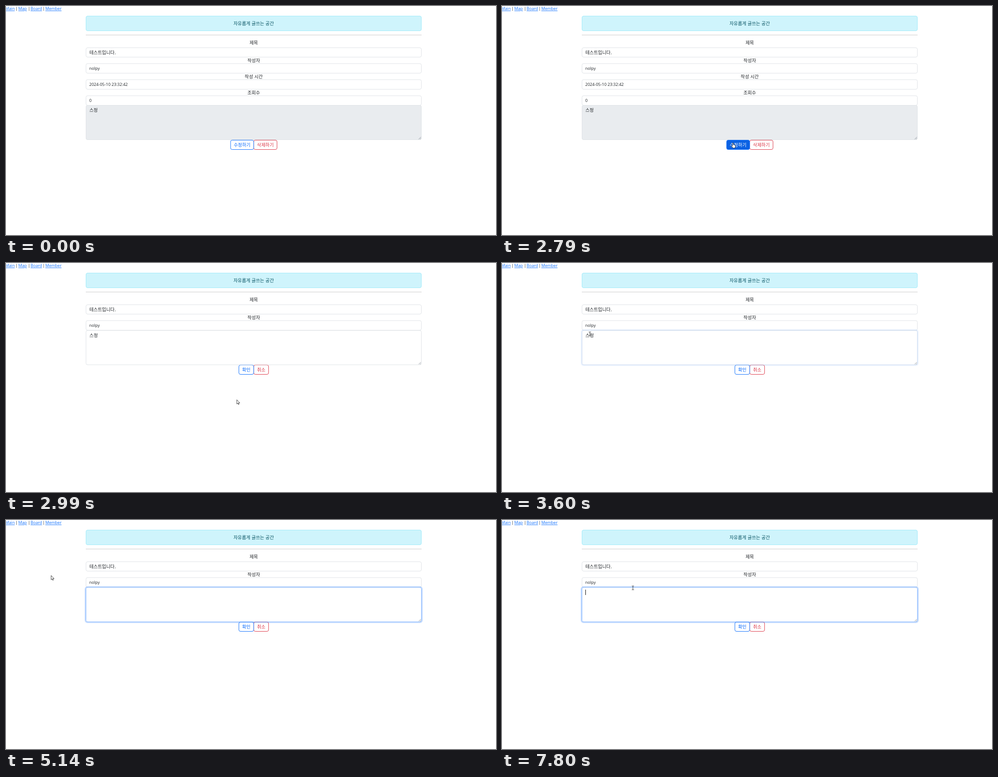
An HTML page for the animation above (8 s loop, 1093 px wide and 513 px high).

```html
<!DOCTYPE html>
<html lang="ko">
<head>
<meta charset="utf-8">
<title>게시판</title>
<style>
  html, body { margin: 0; width: 100%; height: 100%; overflow: hidden; background: #fff; }
  svg { display: block; width: 1093px; height: 513px; }
  text { font: 10.2px "Noto Sans CJK KR", "Noto Sans CJK", sans-serif; fill: #212529; }
  .latin { font: 9.1px "Open Sans", "Noto Sans", sans-serif; }
  .mid { text-anchor: middle; }
  .link { fill: #0d6efd; text-decoration: underline; }
  .box { fill: #fff; stroke: #dee2e6; }
  .blue { fill: #fff; stroke: #0d6efd; }
  .red { fill: #fff; stroke: #dc3545; }
  text.blue { fill: #0d6efd; stroke: none; }
  text.red { fill: #dc3545; stroke: none; }
  .grip { fill: none; stroke: #6c757d; stroke-width: .7; }
  #ring { fill: none; stroke: #0d6efd; stroke-opacity: .25; stroke-width: 2.4; }
  #cursor path { fill: #fff; stroke: #000; stroke-width: .75; stroke-linejoin: round; }
  #cursor #beam { fill: none; stroke: #222; stroke-width: .9; }
</style>
</head>
<body>
<svg viewBox="0 0 1093 513">
  <g class="nav">
    <text class="latin link" x="-1.7" y="9.4">Main</text>
    <text class="latin mid" x="23.5" y="9.4">|</text>
    <text class="latin link" x="27.6" y="9.4">Map</text>
    <text class="latin mid" x="51.4" y="9.4">|</text>
    <text class="latin link" x="54.8" y="9.4">Board</text>
    <text class="latin mid" x="84" y="9.4">|</text>
    <text class="latin link" x="87.7" y="9.4">Member</text>
  </g>

  <rect x="178.5" y="22.5" width="748" height="33" rx="3.5" fill="#cff4fc" stroke="#9eeaf9"/>
  <text class="mid" x="552.5" y="42.7" style="fill:#055160">자유롭게 글쓰는 공간</text>
  <rect x="178" y="64.5" width="749" height="1" fill="#c7c8c9"/>

  <text class="mid" x="552.5" y="85.5">제목</text>
  <rect class="box" x="178.5" y="93.5" width="748" height="21" rx="3.5"/>
  <text x="186" y="107.9">테스트입니다.</text>
  <text class="mid" x="552.5" y="125.9">작성자</text>
  <rect class="box" x="178.5" y="129" width="748" height="21.5" rx="3.5"/>
  <text class="latin" x="185.7" y="143.2">nolpy</text>

  <g id="view">
    <text class="mid" x="552.5" y="161.5">작성 시간</text>
    <rect class="box" x="178.5" y="165" width="748" height="21.5" rx="3.5"/>
    <text class="latin" x="185.7" y="179">2024-05-10 23:32:42</text>
    <text class="mid" x="552.5" y="197.6">조회수</text>
    <rect class="box" x="178.5" y="201" width="748" height="21.5" rx="3.5"/>
    <text class="latin" x="185.7" y="214.8">0</text>
    <rect x="178.5" y="222.5" width="748" height="77" rx="3.5" fill="#e9ecef" stroke="#dee2e6"/>
    <path class="grip" d="M920.5 298.5l5-5M923.5 298.5l2-2"/>
    <text x="186" y="237.4">스정</text>
    <rect class="red" x="552.7" y="300.5" width="51.8" height="21" rx="3.5"/>
    <text class="red mid" x="578.6" y="314.9">삭제하기</text>
    <rect id="modify" class="blue" x="501" y="300.5" width="51.5" height="21" rx="3.5"/>
    <text id="modifyLabel" class="blue mid" x="526.7" y="314.9">수정하기</text>
  </g>

  <g id="edit">
    <rect class="red" x="552.7" y="228.5" width="33" height="21" rx="3.5"/>
    <text class="red mid" x="569.3" y="243">취소</text>
    <rect class="blue" x="519.5" y="228.5" width="33" height="21" rx="3.5"/>
    <text class="blue mid" x="536" y="243">확인</text>
    <rect id="ring" x="176.8" y="149.6" width="751.4" height="79.9" rx="5"/>
    <rect id="area" class="box" x="178.5" y="151" width="748" height="77" rx="3.5"/>
    <path class="grip" d="M920.5 227l5-5M923.5 227l2-2"/>
    <rect id="select" y="155" height="14" fill="#0078d7"/>
    <text x="186" y="165.8"><tspan id="first">스</tspan><tspan id="second">정</tspan></text>
    <rect id="compose" x="186" y="167" width="9" height="1" fill="#212529"/>
    <rect id="caret" y="156" width="1" height="12" fill="#000"/>
  </g>

  <g id="cursor">
    <path id="arrow" d="M.4 .4V9.9L2.6 7.9 4 11.1 5.4 10.5 4 7.4H7Z"/>
    <path id="hand" d="M3.3 .6Q4.4 .6 4.4 1.7V4.8L7.6 5.5Q8.9 5.9 8.8 7.2L8 12.2H3.6L.7 8.4Q0 7.1 1 6.8L2.3 7.8V1.7Q2.3 .6 3.3 .6Z"/>
    <path id="beam" d="M-2.4 .5H-.7L0 1 .7 .5H2.4M0 1V8.5M-2.4 9H-.7L0 8.5 .7 9H2.4"/>
  </g>
</svg>
<script>
const LOOP = 8000;
const el = id => document.getElementById(id);
const show = (id, on) => { el(id).style.display = on ? "" : "none"; };

// Each row holds from its time until the next row.
const at = (rows, t) => rows.reduce((last, row) => (row[0] <= t ? row : last));

const pointer = [
  [0, ""],
  [130, "arrow", 1003, 491], [200, "arrow", 965, 470], [265, "arrow", 872, 424],
  [330, "arrow", 752, 374], [400, "arrow", 642, 338], [465, "arrow", 565, 319],
  [530, "hand", 520, 307], [600, "hand", 511.8, 306],
  [2920, "arrow", 514.5, 306],
  [3060, "arrow", 506, 302], [3130, "arrow", 468, 282], [3200, "arrow", 400, 248],
  [3270, "beam", 328, 208], [3340, "beam", 268, 178], [3400, "beam", 232, 164],
  [3470, "beam", 216, 158], [3530, "beam", 210, 157],
  [3600, "beam", 196, 154], [3670, "beam", 118, 142], [3740, "beam", 4, 133],
  [3810, "arrow", 100.3, 124],
  [6010, "arrow", 116, 128], [6080, "arrow", 168, 140], [6140, "beam", 240, 151],
  [6210, "beam", 273.3, 150.2],
  [6540, "beam", 284, 148.5], [6600, "beam", 292, 147.3]
];

const button = [
  [0, "#fff", "#0d6efd"], [530, "#86b7fe", "#fff"], [600, "#0d6efd", "#fff"],
  [2790, "#0b62e3", "#fff"], [2860, "#0b68f0", "#fff"], [2920, "#0d6efd", "#fff"]
];

const focus = [
  [0, 0, "#dee2e6"], [3600, .3, "#c4d5ed"], [3670, .75, "#9cc2f8"], [3740, 1, "#86b7fe"]
];

const selection = [[0, 0], [3670, 1], [3740, 2], [4210, 0]];

const caret = [
  [0, 0], [4210, 195], [4610, 186], [5140, 0], [5670, 186],
  [6210, 0], [6740, 186], [7270, 0], [7800, 186]
];

function draw(t) {
  const editing = t >= 2990;
  show("view", !editing);
  show("edit", editing);

  const [, fill, ink] = at(button, t);
  el("modify").style.fill = fill;
  el("modifyLabel").style.fill = ink;

  const [, glow, border] = at(focus, t);
  el("ring").style.opacity = glow;
  el("area").style.stroke = border;

  const picked = at(selection, t)[1];
  el("select").setAttribute("x", 205 - picked * 9.5);
  el("select").setAttribute("width", picked * 9.5);
  el("first").style.fill = picked > 1 ? "#fff" : "#212529";
  el("second").style.fill = picked > 0 ? "#fff" : "#212529";
  show("first", t < 4610);
  show("second", t < 4210);
  show("compose", t >= 4210 && t < 4610);

  const caretX = at(caret, t)[1];
  show("caret", caretX > 0);
  el("caret").setAttribute("x", caretX);

  const [, kind, x = 0, y = 0] = at(pointer, t);
  for (const id of ["arrow", "hand", "beam"]) show(id, id === kind);
  el("cursor").setAttribute("transform", `translate(${x} ${y})`);
}

const start = performance.now();
function tick() {
  draw((performance.now() - start) % LOOP);
  requestAnimationFrame(tick);
}
tick();
</script>
</body>
</html>
```
